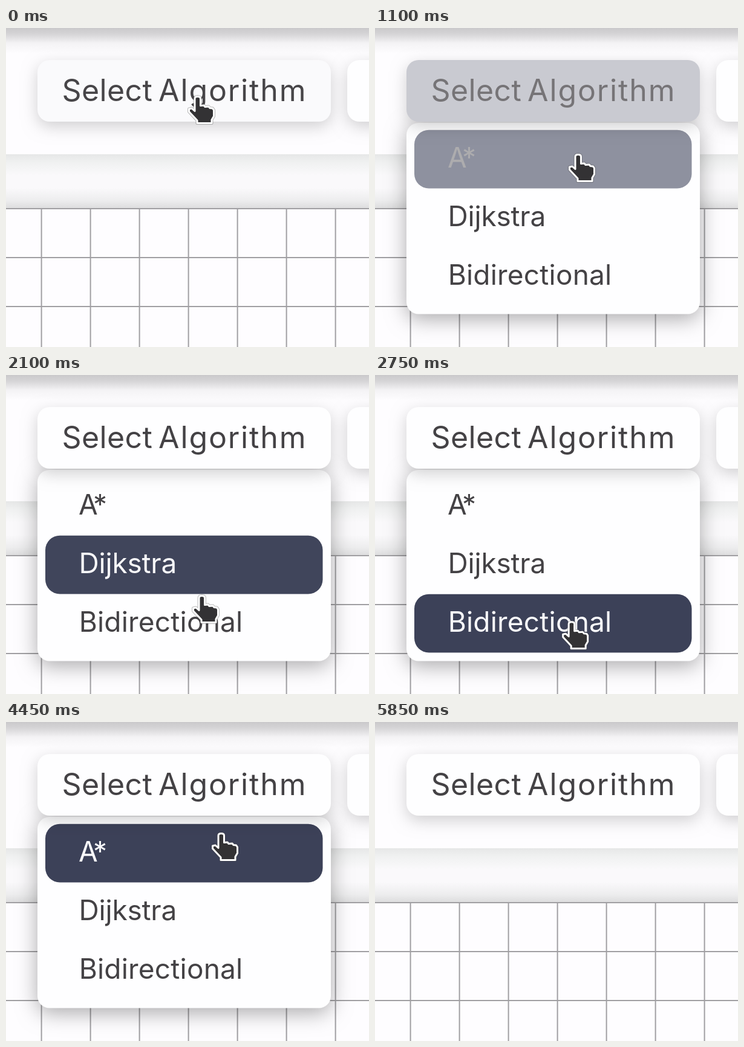
An HTML page with a canvas that plays this animation: 600 by 528 pixels, repeating every 5900 ms.

```html
<!DOCTYPE html>
<html lang="en">
<head>
<meta charset="utf-8">
<title>Algorithm menu</title>
<style>
  html, body { margin: 0; width: 100%; height: 100%; overflow: hidden; background: #fefdff; }
  canvas { display: block; }
</style>
</head>
<body>
<canvas id="stage" width="600" height="528"></canvas>
<script>
const ctx = document.getElementById("stage").getContext("2d");
const LOOP = 5900, STEP = 50, FADE = 300;
const PAPER = [254, 254, 255], NAVY = [60, 65, 88], INK = [68, 66, 69], WHITE = [250, 250, 252];

// Times at which the pointer enters and leaves each part
const buttonHover = [[-10, 970]];
const items = [
  { label: "A*", x: 120, spacing: -4, hover: [[1000, 1550], [3950, 9000]] },
  { label: "Dijkstra", x: 120.5, spacing: -0.2, hover: [[1550, 2090], [3306, 3950]] },
  { label: "Bidirectional", x: 120.7, spacing: 0.2, hover: [[2100, 3314]] },
];

// Pointer: time, x, y of the fingertip
const path = [
  [0, 316, 112], [450, 343, 92], [750, 344, 98], [970, 338, 158], [1100, 335, 208],
  [1550, 330, 268], [2100, 323, 364], [2450, 322, 405], [3000, 326, 409],
  [3320, 338, 360], [3450, 342, 316], [3950, 350, 262], [4450, 355, 183], [5400, 358, 192], [5900, 358, 192],
];
const hand = new Path2D(
  "M-4 5Q-4 1.5 .7 1.5Q5.5 1.5 5.5 5V16.5L11 16L13 18.5L19 18L21 20.5L25.5 21" +
  "L27.5 24V34L24 40V45.5H0V41L-6.5 34L-13.5 26.5V22L-9 21L-4 25.5Z");

// The CSS "ease" curve, solved by bisection
function ease(x) {
  if (x <= 0) return 0;
  if (x >= 1) return 1;
  let lo = 0, hi = 1, p = 0.5;
  for (let i = 0; i < 14; i++) {
    p = (lo + hi) / 2;
    if (0.75 * p * (1 - p) + p ** 3 < x) lo = p; else hi = p;
  }
  return 0.3 * p * (1 - p) ** 2 + 3 * p * p * (1 - p) + p ** 3;
}

const during = (t, spans) => spans.reduce(
  (sum, [from, to]) => sum + ease((t - from) / FADE) - ease((t - to) / FADE), 0);

const mix = (a, b, k) => `rgb(${a.map((v, i) => Math.round(v + (b[i] - v) * k))})`;

function box(x, y, w, h, r, fill, shadow) {
  ctx.save();
  if (shadow) {
    ctx.shadowColor = `rgba(0,0,0,${shadow.alpha})`;
    ctx.shadowBlur = shadow.blur;
    ctx.shadowOffsetY = shadow.y;
  }
  ctx.fillStyle = fill;
  ctx.beginPath();
  ctx.roundRect(x, y, w, h, r);
  ctx.fill();
  ctx.restore();
}

function text(label, x, y, size, spacing, fill) {
  ctx.font = `${size}px Inter, "Open Sans", sans-serif`;
  ctx.letterSpacing = spacing + "px";
  ctx.fillStyle = fill;
  ctx.fillText(label, x, y);
}

function shade(y, h, stops) {
  const g = ctx.createLinearGradient(0, y, 0, y + h);
  stops.forEach(([at, color]) => g.addColorStop(at, color));
  ctx.fillStyle = g;
  ctx.fillRect(0, y, 600, h);
}

function drawPage() {
  ctx.fillStyle = "#fefdff";
  ctx.fillRect(0, 0, 600, 528);
  shade(0, 42, [[0, "#cac9cb"], [0.25, "#d6d5d7"], [0.6, "#f4f3f5"], [1, "#fefdff"]]);
  shade(209, 90, [[0, "#e6e7e7"], [0.15, "#f0f1f1"], [0.38, "#faf9fb"],
    [0.62, "#faf9fb"], [0.85, "#ededee"], [1, "#dcdcdd"]]);
  ctx.fillStyle = "#a09fa2";
  for (let y = 298; y < 528; y += 81) ctx.fillRect(0, y, 600, 2);
  for (let x = 57.6; x < 600; x += 81) ctx.fillRect(x, 298, 2, 230);
}

function drawMenu(t) {
  ctx.globalAlpha = ease((t - 20) / 250) - ease((t - 5430) / FADE);
  if (ctx.globalAlpha > 0) {
    box(52, 157, 485, 316.5, 20, mix(PAPER, NAVY, 0), { alpha: 0.33, blur: 34, y: 8 });
    items.forEach(({ label, x, spacing, hover }, i) => {
      const k = during(t, hover), y = 168.7 + 97 * i;
      if (k > 0) box(65, y, 458.5, 96.8, 24, mix(PAPER, NAVY, k));
      text(label, x, y + 62.3, 46, spacing, mix(INK, WHITE, k));
    });
  }
  ctx.globalAlpha = 1;
}

function drawButtons(t) {
  const k = during(t, buttonHover), shadow = { alpha: 0.18, blur: 26, y: 8 };
  const ink = mix(INK, WHITE, k);
  box(564, 53, 485, 102, 20, mix(PAPER, NAVY, 0), shadow);
  box(52, 53, 485, 102, 20, mix(PAPER, NAVY, k), shadow);
  text("Select", 92.5, 121, 50, 0.4, ink);
  text("Algorithm", 252, 121, 50, 1.9, ink);
}

function drawPointer(t) {
  if (t >= 5600) return;
  const i = path.findIndex(p => p[0] > t);
  const [t0, x0, y0] = path[i - 1], [t1, x1, y1] = path[i];
  const k = (t - t0) / (t1 - t0);
  ctx.save();
  ctx.translate(x0 + (x1 - x0) * k, y0 + (y1 - y0) * k);
  ctx.lineJoin = "round";
  ctx.lineWidth = 5;
  ctx.strokeStyle = "rgba(60,60,60,.35)";
  ctx.stroke(hand);
  ctx.fillStyle = "#333234";
  ctx.fill(hand);
  ctx.lineWidth = 3;
  ctx.strokeStyle = "#fff";
  ctx.stroke(hand);
  ctx.restore();
}

const start = performance.now();
function frame() {
  const now = Math.max(0, performance.now() - start) % LOOP;
  const t = Math.floor(now / STEP) * STEP;
  drawPage();
  drawMenu(t);
  drawButtons(t);
  drawPointer(t);
  requestAnimationFrame(frame);
}
frame();
</script>
</body>
</html>
```
